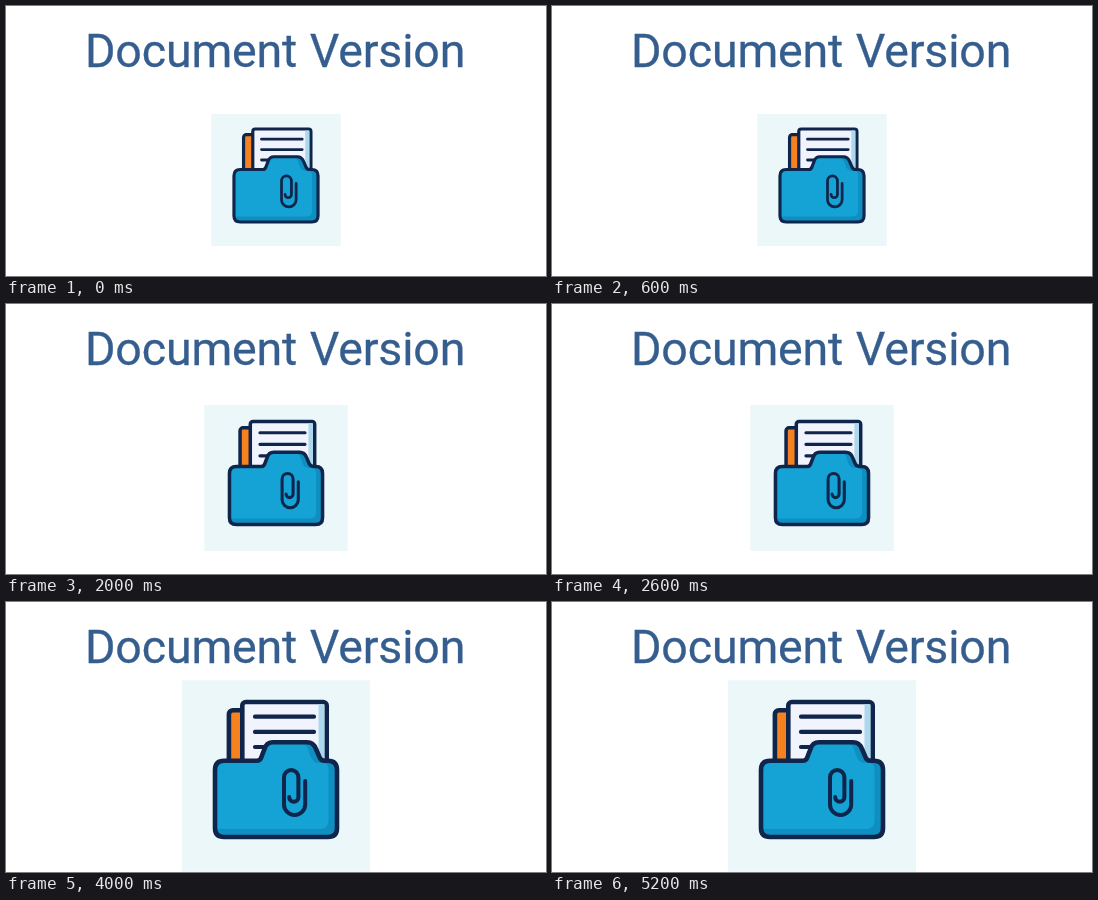
An HTML page that plays this animation: 540 by 270 pixels, repeating every 6 s.

```html
<!DOCTYPE html>
<html lang="en">
<head>
<meta charset="utf-8">
<title>Document Version</title>
<style>
  html, body { margin: 0; width: 100%; height: 100%; overflow: hidden; background: #fff; }
  svg { display: block; width: 100%; height: 100%; }
  .title { font: 400 46.5px Roboto, Inter, sans-serif; letter-spacing: -.15px; word-spacing: 1.2px; fill: #355e8f; stroke: #355e8f; stroke-width: .3; }
  .ink { stroke: #10254b; stroke-width: 4.6; stroke-linejoin: round; stroke-linecap: round; }
</style>
</head>
<body>
<svg viewBox="0 0 540 270">
  <defs>
    <path id="shape" d="M209 168Q209 158.8 218 158.8H251Q254.5 158.8 255.8 154L258.5 147Q260.5 140.3 267 140.3H301Q307.5 140.3 310 147L313 154Q314.5 158.8 319 158.8H322Q331 158.8 331 168V226Q331 235 322 235H218Q209 235 209 226Z"/>
    <clipPath id="inside"><use href="#shape"/></clipPath>
  </defs>
  <text class="title" x="79" y="61">Document Version</text>
  <g id="icon">
    <rect x="176" y="78.3" width="188" height="191.5" fill="#ecf7fa"/>
    <rect class="ink" x="222.9" y="108.2" width="24" height="70" rx="4" fill="#f5821f"/>
    <rect class="ink" x="236.3" y="100" width="84.4" height="78" rx="3.5" fill="#f1f4fd"/>
    <path d="M312.5 102.3H318.4V165H312.5Z" fill="#acd8ee"/>
    <path class="ink" style="stroke-width:4.2" d="M249 114.7H308M249 129.9H308M249 145H290" fill="none"/>
    <use href="#shape" fill="#14a3d4"/>
    <g clip-path="url(#inside)" fill="#0f8fc1">
      <path d="M294 140Q301 142 303 150Q305 159 311 161H317Q322.5 161 322.5 168V218Q322.5 227 314 227H209V237H333V140Z"/>
    </g>
    <use class="ink" href="#shape" fill="none"/>
    <path class="ink" style="stroke-width:4" fill="none" d="M299.2 179V202.5A10.6 10.5 0 0 1 278 202.5V175.5A7.2 7.5 0 0 1 292.4 175.5V195A4.6 4.7 0 0 1 283.2 195"/>
  </g>
</svg>
<script>
  const LOOP = 6000, STEP = 1000;
  const scales = [.689, .721, .763, .84, 1];
  const icon = document.getElementById('icon');

  // The icon grows in hard steps about its centre; the last size holds longer.
  function draw(time) {
    const step = Math.min(Math.floor(time % LOOP / STEP), scales.length - 1);
    icon.setAttribute('transform', `translate(270 174) scale(${scales[step]}) translate(-270 -174)`);
  }

  const start = performance.now();
  function tick() {
    draw(performance.now() - start);
    requestAnimationFrame(tick);
  }
  tick();
</script>
</body>
</html>
```
